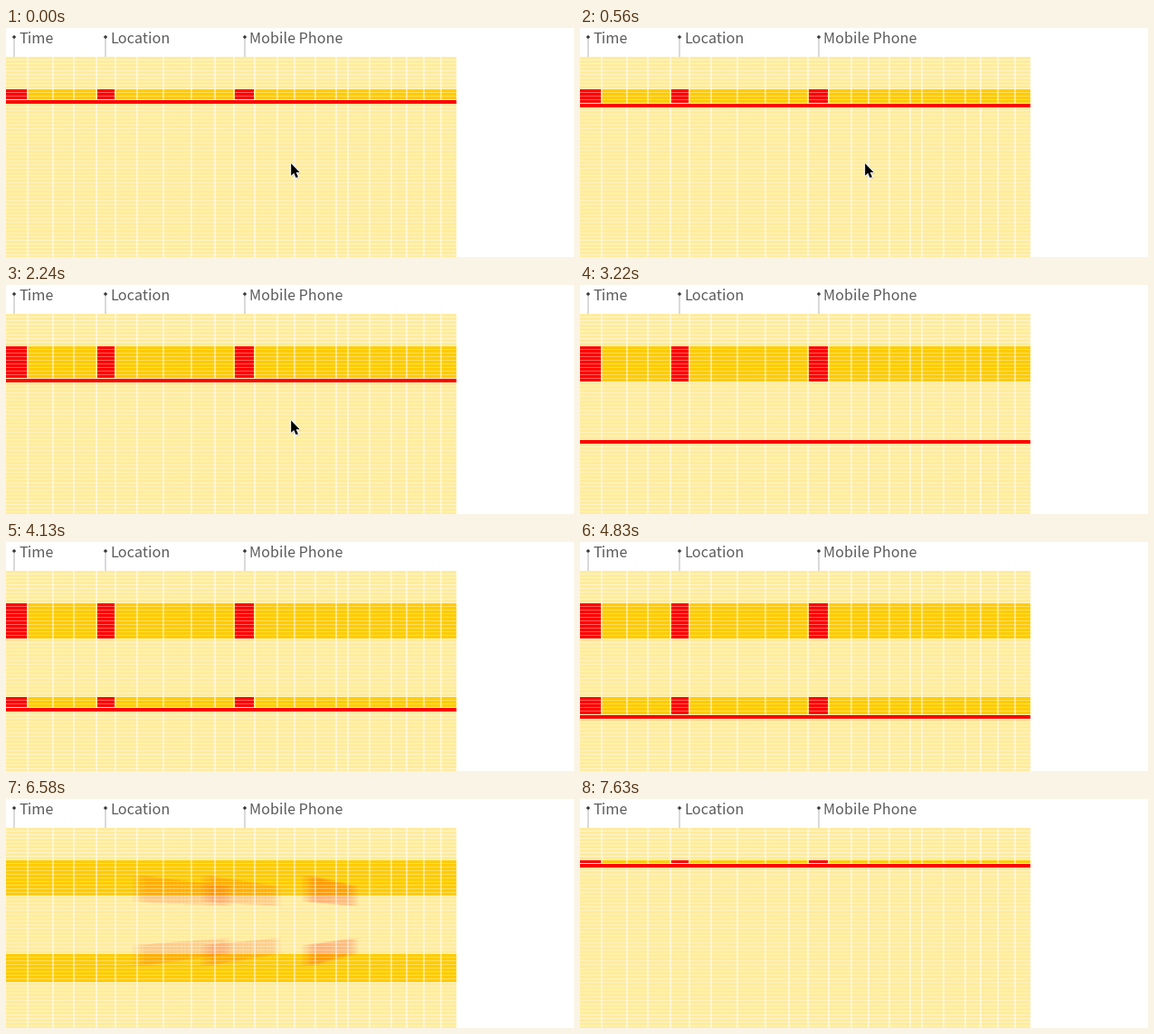
A matplotlib script for the animation above (7700 ms loop, 628 by 254 pixels).

```python
import matplotlib.pyplot as plt
import numpy as np
from matplotlib.animation import FuncAnimation
from matplotlib.collections import PolyCollection
from matplotlib.patches import Polygon, Rectangle

W, H, DPI = 628, 254, 100
FRAMES, STEP_MS = 110, 70
PX = 72 / DPI

ROW, ROW0 = 4, 68             # row pitch and top of the first matching row
TOP, RIGHT = 32, 498
BLOCKS = [(0, 10), (26, 8)]   # first row, row count
FIELDS = [(0, 23), (101, 120), (253, 274)]
COLUMNS = [24, 52, 75, 100, 121, 145, 174, 205, 231, 252, 275, 300,
           319, 342, 365, 378, 402, 426, 443, 462, 481]
LABELS = [(9, "Time"), (110, "Location"), (264, "Mobile Phone")]

RED, GOLD, PALE = "#ff0000", "#ffcb00", "#ffec9c"
HUB = (538, 132)
RESULT_X = 537
FLY, LANDED, RESTART = 93, 96, 102
CURSOR_END = 45

plt.rcParams["font.family"] = ["Noto Sans CJK JP", "DejaVu Sans"]
fig = plt.figure(figsize=(W / DPI, H / DPI), dpi=DPI, facecolor="white")
ax = fig.add_axes([0, 0, 1, 1])
ax.set_xlim(0, W)
ax.set_ylim(H, 0)
ax.axis("off")


def row_y(k):
    return ROW0 + k * ROW


def box(x0, y0, x1, y1, color, z, alpha=1):
    patch = Rectangle((x0, y0), x1 - x0, y1 - y0, fc=color, lw=0,
                      alpha=alpha, zorder=z)
    return ax.add_patch(patch)


def row_gap(x0, x1, y, z, alpha=0.38):
    """Light pixel row that closes the table row ending at y."""
    return box(x0, y - 1, x1, y, "white", z, alpha)


def corners(x0, y0, x1, y1):
    return [(x0, y0), (x1, y0), (x1, y1), (x0, y1)]


def draw_table():
    box(0, TOP, RIGHT, H, PALE, 0)
    for k in range(-8, 47):
        row_gap(0, RIGHT, row_y(k), 5, 0.38 if 0 < k < 42 else 0.5)
    for x in COLUMNS:
        box(x - 1, TOP, x + 1, H, "white", 5, 0.5)


def draw_labels():
    for x, name in LABELS:
        box(x - 1, 12, x + 1, TOP, "#dadada", 2)
        ax.add_patch(Polygon([(x, 7.8), (x + 2.2, 10), (x, 12.2), (x - 2.2, 10)],
                             fc="#3a3a3a", lw=0, zorder=3))
        ax.text(x + 5.2, 17, name, size=16.2 * PX, color="#5c5c5c",
                va="baseline")


def draw_cursor():
    shape = np.array([(0, 0), (0, 12.6), (2.9, 9.9), (5, 14.8), (7.2, 13.8),
                      (5.1, 9.2), (8.8, 9.2)]) * 1.08 + (315.2, 150.2)
    shadow = Polygon(shape + (1.5, 1.5), fc="#777777", lw=0, alpha=0.35, zorder=8)
    halo = Polygon(shape, fc="white", ec="white", lw=2 * PX, zorder=9)
    arrow = Polygon(shape, fc="black", lw=0, zorder=10)
    return [ax.add_patch(p) for p in (shadow, halo, arrow)]


def scan_row(f):
    """Row under the scan line: slow on matches, quick elsewhere."""
    if f >= RESTART:
        return (f - RESTART) // 5
    if f < 35:
        return (f + 15) // 5
    if f < 43:
        return 10 + (f - 35) * 2
    if f < 83:
        return 26 + (f - 43) // 5
    return 34 + (f - 83) * 2


def flight(f):
    """Blurred copies of the picked cells shrinking towards the hub."""
    mid = 0.35 + 0.32 * (f - 94)
    shapes = []
    for p in np.clip(np.linspace(mid - 0.09, mid + 0.09, 24), 0, 1):
        for first, count in BLOCKS:
            ys = [y + p * (HUB[1] - y) for y in (row_y(first), row_y(first + count))]
            for field in FIELDS:
                xs = [x + p * (HUB[0] - x) for x in field]
                shapes.append(corners(xs[0], ys[0], xs[1], ys[1]))
    return shapes


def draw_result():
    rows = sum(count for _, count in BLOCKS)
    y0 = HUB[1] - rows * ROW / 2
    parts, x = [], RESULT_X
    for a, b in FIELDS:
        parts.append(box(x, y0, x + b - a, y0 + rows * ROW - 1, RED, 3))
        x += b - a + 1
    for k in range(1, rows):
        parts.append(row_gap(RESULT_X, x, y0 + k * ROW, 4))
    return parts


draw_table()
draw_labels()
cursor = draw_cursor()
result = draw_result()
bands = [box(0, row_y(k), RIGHT, row_y(k), GOLD, 1) for k, _ in BLOCKS]
cells = [[box(a, row_y(k), b, row_y(k), RED, 2) for a, b in FIELDS]
         for k, _ in BLOCKS]
scan = box(0, 0, RIGHT, 4.3, RED, 7)
blur = ax.add_collection(PolyCollection([], facecolors=RED, linewidths=0,
                                        alpha=0.036, zorder=3))


def update(f):
    row = scan_row(f)
    for (first, count), band, group in zip(BLOCKS, bands, cells):
        done = min(max(row - first, 0), count)
        height = max(done * ROW - 1, 0)
        band.set_height(height)
        for cell in group:
            cell.set_height(height)
            cell.set_visible(not FLY <= f < RESTART)
    scan.set_y(row_y(row) - 0.5)
    scan.set_visible(row_y(row) < H)
    blur.set_verts(flight(f) if FLY <= f <= LANDED else [])
    for part in result:
        part.set_visible(LANDED <= f < RESTART)
    for part in cursor:
        part.set_visible(f < CURSOR_END)
    return []


anim = FuncAnimation(fig, update, frames=FRAMES, interval=STEP_MS,
                     repeat=True, repeat_delay=0, blit=False)
plt.show()
```
